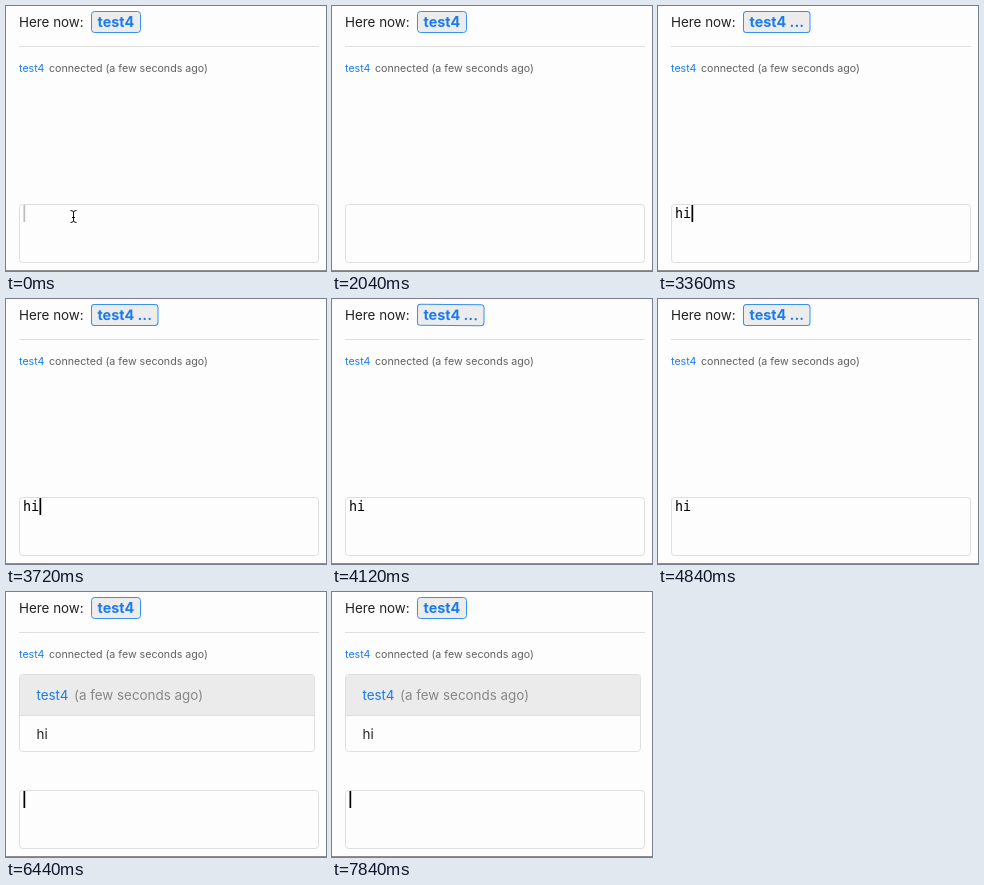
Write an HTML page that moves like this. It is 320 px wide and 265 px high and loops after 8520 ms.

```html
<!DOCTYPE html>
<html lang="en">
<head>
<meta charset="utf-8">
<title>Presence chat</title>
<style>
  html, body { margin: 0; width: 100%; height: 100%; overflow: hidden; background: #fdfdfd; }
  svg { display: block; width: 320px; height: 265px; font: 13.4px Inter, "Open Sans", sans-serif; fill: #222; }
  .box { fill: #fdfdfd; stroke: #dedede; }
  .name { fill: #1a7cec; }
  .small { font-size: 10.65px; }
  .note { fill: #606060; }
  .pale { fill: #888; }
  #badge rect { fill: #ececec; stroke: #3590ee; }
  #badge text { font-size: 14.4px; font-weight: 700; }
  #draft { font: 13.4px "DejaVu Sans Mono", monospace; fill: #000; }
</style>
</head>
<body>
<svg viewBox="0 0 320 265">
  <text x="13" y="21">Here now:</text>
  <g id="badge">
    <rect id="frame" x="85.5" y="5.5" height="21" rx="3"/>
    <text id="label" class="name" x="91.5" y="21"></text>
  </g>
  <path d="M13 40.5H313" stroke="#dedede"/>
  <text class="small name" x="13" y="65.5">test4</text>
  <text class="small note" x="43" y="65.5">connected (a few seconds ago)</text>

  <g id="message">
    <rect class="box" x="13.5" y="82.5" width="295" height="77" rx="3"/>
    <path d="M14 123V85.5Q14 83 16.5 83H305.5Q308 83 308 85.5V123Z" fill="#ebebeb"/>
    <path d="M14 123.5H308" stroke="#dedede"/>
    <text class="name" x="30.5" y="108">test4</text>
    <text class="pale" x="68" y="108">(a few seconds ago)</text>
    <text x="30.5" y="146.5">hi</text>
  </g>

  <rect class="box" x="13.5" y="198.5" width="299" height="58" rx="3"/>
  <text id="draft" x="17" y="212"></text>
  <rect id="caret" y="199" width="1.7" height="17"/>
  <path id="pointer" d="M64.5 204.5Q67.5 204.5 67.5 206.5Q67.5 204.5 70.5 204.5M67.5 206V215M64.5 216.5Q67.5 216.5 67.5 214.5Q67.5 216.5 70.5 216.5M66 211.5H69" fill="none" stroke="#111"/>
  <path d="M0 264.5H320" stroke="#8c8c8c"/>
</svg>
<script>
const LOOP = 8520, FIRST_KEY = 2120, SECOND_KEY = 2680, SENT = 5840;
const WOBBLE_START = 2620, WOBBLE_PERIOD = 740, WOBBLE_DEGREES = 2.2;
const CARET_OFF = [[1400, FIRST_KEY], [4100, 4860], [7240, 7840]];

const el = id => document.getElementById(id);
const [badge, frame, label, message, draft, caret, pointer] =
  ["badge", "frame", "label", "message", "draft", "caret", "pointer"].map(el);
const within = (t, from, to) => t >= from && t < to;
const show = (node, visible) => node.setAttribute("visibility", visible ? "visible" : "hidden");

function render(t) {
  const typing = within(t, SECOND_KEY, SENT);
  const angle = typing ? WOBBLE_DEGREES * Math.sin(2 * Math.PI * (t - WOBBLE_START) / WOBBLE_PERIOD) : 0;
  badge.setAttribute("transform", `rotate(${angle} 119 16)`);
  frame.setAttribute("width", typing ? 66.5 : 49);
  label.textContent = typing ? "test4 ..." : "test4";

  const text = typing ? "hi" : within(t, FIRST_KEY, SECOND_KEY) ? "h" : "";
  draft.textContent = text;
  caret.setAttribute("x", 17.5 + 8 * text.length);
  caret.setAttribute("fill", t < 40 ? "#bcbcbc" : "#000");
  show(caret, !CARET_OFF.some(([from, to]) => within(t, from, to)));
  show(pointer, t < 2040);
  show(message, t >= SENT);
}

const start = performance.now();
function tick() {
  render((performance.now() - start) % LOOP);
  requestAnimationFrame(tick);
}
tick();
</script>
</body>
</html>
```
